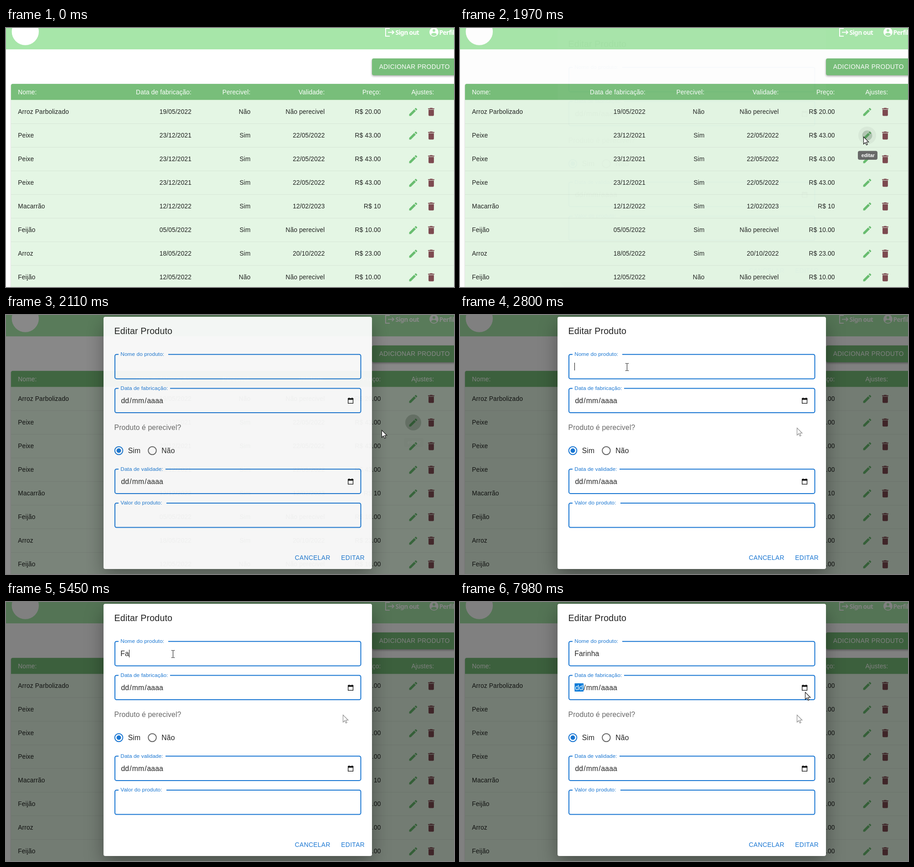
Animation of 983 by 570 pixels, one loop 8 s. Source, as an HTML page with a canvas:

```html
<!DOCTYPE html>
<html lang="pt">
<head>
<meta charset="utf-8">
<title>Editar Produto</title>
<style>
html, body { margin: 0; width: 100%; height: 100%; overflow: hidden; background: #fff; }
canvas { display: block; }
</style>
</head>
<body>
<canvas id="stage" width="983" height="570"></canvas>
<script>
const W = 983, H = 570, LOOP = 8000;
const ZOOM = 589 / 600;
const SANS = '"Liberation Sans", Arial, sans-serif';
const BLUE = '#1976d2', GREEN = '#78be7a', MINT = '#a7e6a9', INK = 'rgba(0,0,0,.87)';
const PENCIL = new Path2D('M3 17.25V21h3.75L17.81 9.94l-3.75-3.75zM20.71 7.04a1 1 0 0 0 0-1.41l-2.34-2.34a1 1 0 0 0-1.41 0l-1.83 1.83 3.75 3.75z');
const TRASH = new Path2D('M6 19a2 2 0 0 0 2 2h8a2 2 0 0 0 2-2V7H6zM19 4h-3.5l-1-1h-5l-1 1H5v2h14z');
const ARROW = new Path2D('M.5.5V16.5L4.2 13l2.6 5.6 2.4-1.1L6.7 12h5.1z');

const COLUMNS = [407, 536.5, 699.5, 822.5];
const HEADINGS = ['Data de fabricação:', 'Perecivel:', 'Validade:', 'Preço:'];
const FISH = ['Peixe', '23/12/2021', 'Sim', '22/05/2022', 'R$ 43.00'];
const ROWS = [
  ['Arroz Parbolizado', '19/05/2022', 'Não', 'Não perecivel', 'R$ 20.00'],
  FISH, FISH, FISH,
  ['Macarrão', '12/12/2022', 'Sim', '12/02/2023', 'R$ 10'],
  ['Feijão', '05/05/2022', 'Sim', 'Não perecivel', 'R$ 10.00'],
  ['Arroz', '18/05/2022', 'Sim', '20/10/2022', 'R$ 23.00'],
  ['Feijão', '12/05/2022', 'Não', 'Não perecivel', 'R$ 10.00']
];

// Pointer paths, one point per screen update
const TO_BUTTON = [[788, 546], [800, 500], [822, 440], [850, 380], [880, 322], [910, 272],
  [930, 240], [934, 230], [920, 229], [902, 233], [890, 237], [885, 239]];
const TO_NAME = [[885, 239], [885, 239], [885, 239], [885, 239], [863, 248], [824, 253],
  [739, 248], [630, 212], [530, 168], [450, 134], [395, 117], [368, 114]];
const TO_DATE = [[378, 112], [398, 116], [435, 125], [485, 137], [545, 153], [605, 170],
  [655, 185], [695, 197], [725, 205], [745, 207], [755, 202], [757, 198]];
const KEY_TIMES = [5050, 5450, 5650, 6150, 6280, 6480, 6540];

const clamp = v => Math.max(0, Math.min(1, v));
const ramp = (t, a, b) => clamp((t - a) / (b - a));

// cubic-bezier(.4, 0, .2, 1)
function ease(x) {
  let lo = 0, hi = 1;
  for (let i = 0; i < 24; i++) {
    const s = (lo + hi) / 2, r = 1 - s;
    if (1.2 * r * r * s + .6 * r * s * s + s ** 3 < x) lo = s; else hi = s;
  }
  return 3 * (1 - lo) * lo * lo + lo ** 3;
}

function text(c, str, x, y, size, color = INK, { spacing = .147, align = 'left', font = SANS, weight = 400 } = {}) {
  c.font = `${weight} ${size * ZOOM}px ${font}`;
  c.letterSpacing = spacing + 'px';
  c.textAlign = 'left';
  c.fillStyle = color;
  c.fillText(str, align === 'right' ? x - c.measureText(str).width : x, y);
}

function box(c, x, y, w, h, radius, color) {
  c.fillStyle = color;
  c.beginPath();
  c.roundRect(x, y, w, h, radius);
  c.fill();
}

function disc(c, x, y, r, color) {
  c.fillStyle = color;
  c.beginPath();
  c.arc(x, y, r, 0, 7);
  c.fill();
}

function ring(c, x, y, r, color) {
  c.strokeStyle = color;
  c.lineWidth = 2;
  c.beginPath();
  c.arc(x, y, r, 0, 7);
  c.stroke();
}

function shadow(c, blur, dy, alpha) {
  c.shadowColor = `rgba(0,0,0,${alpha})`;
  c.shadowBlur = blur;
  c.shadowOffsetY = dy;
}

function icon(c, path, x, y, color) {
  c.save();
  c.translate(x - 12 * ZOOM, y - 12 * ZOOM);
  c.scale(ZOOM, ZOOM);
  c.fillStyle = color;
  c.fill(path);
  c.restore();
}

function layer(paint) {
  const cv = document.createElement('canvas');
  cv.width = W;
  cv.height = H;
  paint(cv.getContext('2d'));
  return cv;
}

function paintTopBar(c) {
  c.fillStyle = MINT;
  c.fillRect(0, 0, W, 47);
  disc(c, 42.3, 8, 29.7, '#fff');
  c.strokeStyle = '#fff';
  c.lineWidth = 2;
  c.beginPath();
  c.moveTo(842, 1); c.lineTo(833, 1); c.lineTo(833, 18); c.lineTo(842, 18);
  c.moveTo(838, 9.5); c.lineTo(851, 9.5);
  c.moveTo(847, 5.5); c.lineTo(851, 9.5); c.lineTo(847, 13.5);
  c.stroke();
  const menu = { spacing: -.7, font: '"Noto Sans", sans-serif', weight: 600 };
  text(c, 'Sign out', 854.5, 15, 14.2, '#fff', menu);
  text(c, 'Perfil', 950.5, 15, 14.2, '#fff', menu);
  disc(c, 939, 9, 10, '#fff');
  disc(c, 939, 5.5, 3, MINT);
  c.beginPath();
  c.ellipse(939, 14, 6, 3.3, 0, 0, 7);
  c.fill();
}

const page = layer(c => {
  c.fillStyle = '#fff';
  c.fillRect(0, 0, W, H);
  paintTopBar(c);
  c.save();
  shadow(c, 4, 2, .35);
  box(c, 803, 67, 200, 37, 4, GREEN);
  c.restore();
  text(c, 'ADICIONAR PRODUTO', 818.7, 89.5, 14, '#fff', { spacing: .393 });

  c.save();
  shadow(c, 3, 1, .25);
  box(c, 11, 123, 1000, 470, 4, '#e4f6e4');
  c.restore();
  box(c, 11, 123, 1000, 35.3, [4, 0, 0, 0], GREEN);
  text(c, 'Nome:', 26.3, 145.5, 14, '#fff');
  HEADINGS.forEach((h, i) => text(c, h, COLUMNS[i], 145.5, 14, '#fff', { align: 'right' }));
  text(c, 'Ajustes:', 939.5, 145.5, 14, '#fff', { align: 'right' });
  ROWS.forEach(([name, ...cells], i) => {
    const y = 189 + 52 * i;
    text(c, name, 26.3, y, 14);
    cells.forEach((s, k) => text(c, s, COLUMNS[k], y, 14, INK, { align: 'right' }));
    icon(c, PENCIL, 893.5, y - 4.3, '#69bd70');
    icon(c, TRASH, 933, y - 4.3, '#7d4a50');
    c.fillStyle = '#d6e6d6';
    c.fillRect(11, 210 + 52.1 * i | 0, W, 1);
  });
});

function paintField(c, label, y, gapEnd) {
  const l = 239, r = 778.5, b = y + 53.6, k = 3.5;
  c.strokeStyle = BLUE;
  c.lineWidth = 2;
  c.beginPath();
  c.moveTo(gapEnd, y);
  c.arcTo(r, y, r, b, k);
  c.arcTo(r, b, l, b, k);
  c.arcTo(l, b, l, y, k);
  c.arcTo(l, y, r, y, k);
  c.lineTo(247, y);
  c.stroke();
  text(c, label, 251.3, y + 3.4, 12, BLUE, { spacing: .11 });
}

function paintDate(c, y) {
  [['dd', 252.4], ['/', 271.3], ['mm', 276.7], ['/', 304.2], ['aaaa', 309.5]]
    .forEach(([s, x]) => text(c, s, x, y, 16));
  c.strokeStyle = c.fillStyle = '#111';
  c.lineWidth = 1.3;
  c.strokeRect(750.7, y - 10.4, 10.8, 10.8);
  c.fillRect(750, y - 11, 12.2, 3.6);
  c.fillRect(752, y - 12.2, 1.5, 2);
  c.fillRect(758.7, y - 12.2, 1.5, 2);
}

const dialog = layer(c => {
  c.save();
  shadow(c, 40, 16, .35);
  box(c, 214, 4, 589, 555, 4, '#fff');
  c.restore();
  text(c, 'Editar Produto', 237.6, 42, 20);
  paintField(c, 'Nome do produto:', 86.8, 356);
  paintField(c, 'Data de fabricação:', 161.4, 360);
  paintField(c, 'Data de validade:', 339.3, 350);
  paintField(c, 'Valor do produto:', 413.9, 352);
  paintDate(c, 194);
  paintDate(c, 372);
  text(c, 'Produto é perecivel?', 237.6, 252.5, 16, 'rgba(0,0,0,.6)');
  ring(c, 247.5, 298.5, 8.8, BLUE);
  disc(c, 247.5, 298.5, 5, BLUE);
  ring(c, 321, 298.5, 8.8, '#666');
  text(c, 'Sim', 267.7, 304, 16);
  text(c, 'Não', 341.3, 304, 16);
  text(c, 'CANCELAR', 633.8, 538.8, 14, BLUE, { spacing: .393 });
  text(c, 'EDITAR', 735.3, 538.8, 14, BLUE, { spacing: .393 });
});

const g = document.getElementById('stage').getContext('2d');

function withAlpha(alpha, paint) {
  if (alpha <= 0) return;
  g.save();
  g.globalAlpha = alpha;
  paint();
  g.restore();
}

function drawArrow(x, y) {
  g.save();
  g.translate(x, y);
  g.fillStyle = '#fff';
  g.fill(ARROW);
  g.strokeStyle = '#111';
  g.lineWidth = 1.1;
  g.stroke(ARROW);
  g.restore();
}

function drawBeam(x, y) {
  g.fillStyle = '#111';
  g.fillRect(x, y - 7, 1, 15);
  for (const edge of [y - 8, y + 8]) {
    g.fillRect(x - 3, edge, 3, 1);
    g.fillRect(x + 1, edge, 3, 1);
  }
}

function pointerAt(t) {
  const along = (path, start, step) => path[Math.min(path.length - 1, Math.max(0, Math.floor((t - start) / step)))];
  if (t < 330) return null;
  if (t < 1765) return along(TO_BUTTON, 330, 70);
  if (t < 2600) return along(TO_NAME, 1765, 68.2);
  return t < 7010 ? [366, 114] : along(TO_DATE, 7010, 70);
}

function drawPointer(t) {
  const p = pointerAt(t);
  if (!p) return;
  const [x, y] = p;
  const overName = t > 2200 && x > 238 && x < 779 && y > 86 && y < 141;
  (overName ? drawBeam : drawArrow)(x, y);
}

function drawButtonFeedback(t) {
  if (t >= 1100 && t < 2010) disc(g, 893.5, 236.5, 19.6, 'rgba(0,0,0,.045)');
  if (t < 1765) return;
  const r = 11 * ramp(t, 1765, 1970) + 4 * ramp(t, 1970, 2038) + 2.5 * ramp(t, 2038, 2106);
  withAlpha(1 - ramp(t, 2110, 2300), () => disc(g, 893.5, 236.5, r, 'rgba(50,85,55,.24)'));
}

function drawTooltip(t) {
  const alpha = ramp(t, 1130, 1250) * (1 - .95 * ramp(t, 2025, 2106)) * (t < 2170 ? 1 : 0);
  withAlpha(alpha, () => {
    box(g, 873, 270.5, 43, 19.5, 4, 'rgba(97,97,97,.94)');
    text(g, 'editar', 880.7, 284, 11, '#fff', { spacing: 0, weight: 700 });
  });
}

function drawNameInput(t) {
  const typed = 'Farinha'.slice(0, KEY_TIMES.filter(k => t >= k).length);
  text(g, typed, 251.2, 119, 16);
  if (t < 2800 || t >= 7850) return;
  const since = Math.max(2800, t >= 4920 ? 4920 : 0, ...KEY_TIMES.filter(k => t >= k));
  if (Math.floor((t - since) / 530) % 2) return;
  g.fillStyle = '#111';
  g.fillRect(Math.floor(251.6 + g.measureText(typed).width), 105, 1, 17);
}

// The screen refreshes in steps while things move
function refresh(t) {
  return t >= 1765 && t < 2600 ? 1765 + Math.floor((t - 1765) / 68.2) * 68.2 : t;
}

function draw(time) {
  const t = refresh(time);
  g.drawImage(page, 0, 0);
  drawButtonFeedback(t);
  const open = ease(ramp(t, 1950, 2175));
  if (t > 1950) {
    g.fillStyle = `rgba(0,0,0,${.5 * open})`;
    g.fillRect(0, 0, W, H);
    withAlpha(open, () => g.drawImage(dialog, 0, 0));
    drawNameInput(time);
  }
  if (time >= 7850) {
    g.fillStyle = '#0078d7';
    g.fillRect(251.5, 179, 19.5, 18);
    text(g, 'dd', 252.4, 194, 16, '#fff');
  }
  // Stale pointer image left on the dialog
  if (time >= 2242) withAlpha(.5, () => drawArrow(739, 248));
  drawTooltip(t);
  drawPointer(time);
}

const begin = performance.now();
function tick() {
  draw((performance.now() - begin) % LOOP);
  requestAnimationFrame(tick);
}
tick();
</script>
</body>
</html>
```
